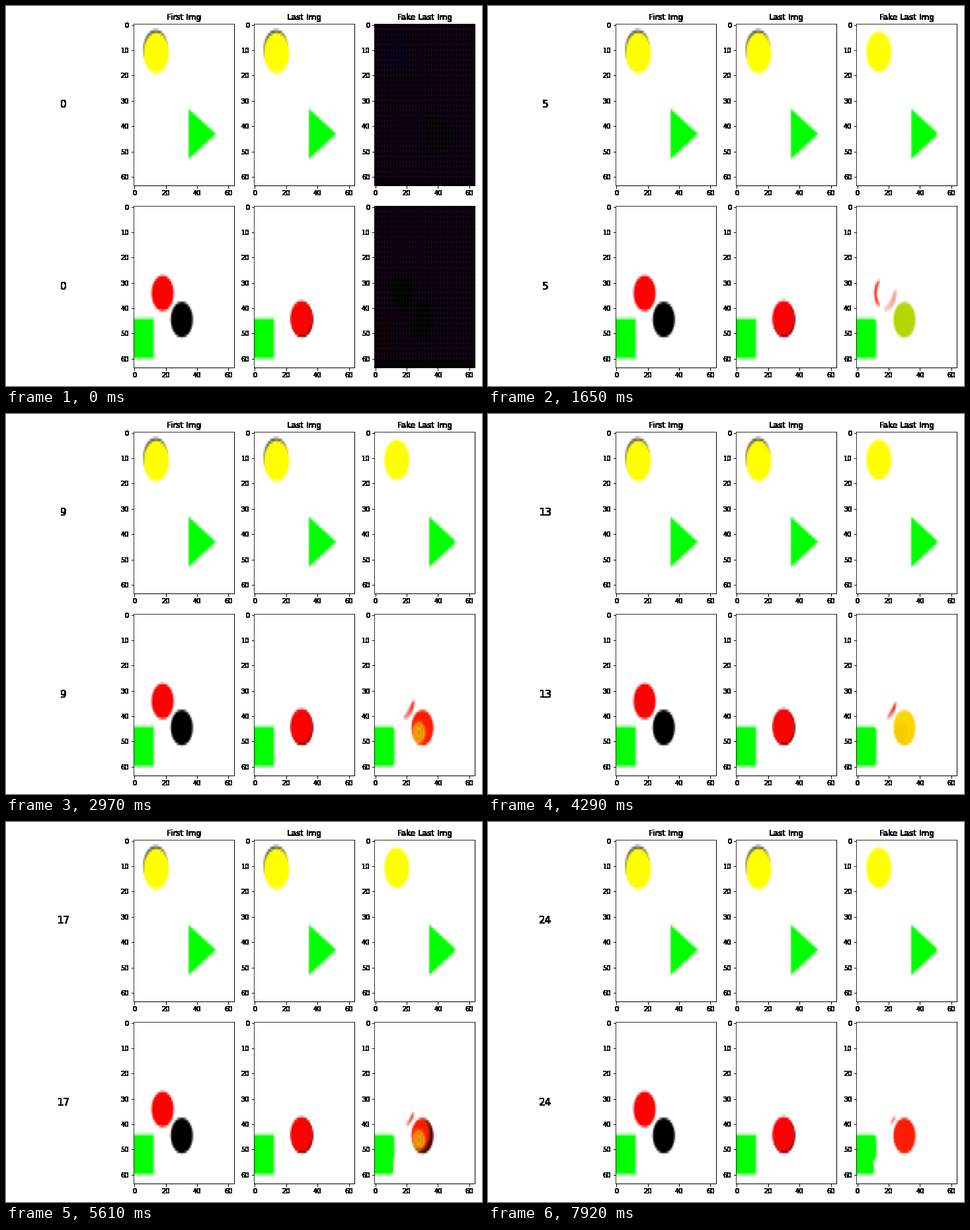
These frames come from a looping animation (720 px wide and 576 px high, 8 s). A matplotlib script:

```python
import numpy as np
import matplotlib.pyplot as plt
from matplotlib.animation import FuncAnimation

W, H, DPI = 720, 576, 72
LOOP, STEP, HOLD = 8000, 40, 330
EPOCHS = 25
TITLES = ("First Img", "Last Img", "Fake Last Img")

YELLOW, GREEN, RED = (255, 255, 0), (0, 255, 0), (255, 0, 0)
BLACK, GRAY, CYAN = (0, 0, 0), (90, 84, 84), (0, 200, 220)
BROWN, SCARLET, AMBER = (65, 38, 10), (245, 65, 42), (240, 175, 10)
Y, X = np.mgrid[0:64, 0:64].astype(float)


def ease(t, start, end):
    u = np.clip((t - start) / (end - start), 0, 1)
    return u * u * (3 - 2 * u)


def bump(t, middle, width):
    return np.exp(-((t - middle) / width) ** 2)


def mix(a, b, u):
    return np.array(a, float) * (1 - u) + np.array(b, float) * u


def blur(epoch):
    return .9 + 2.4 * np.exp(-epoch / 2)


def ramp(d, soft=1.0):
    return np.clip(d / soft + .5, 0, 1)


def dist(cx, cy):
    return np.hypot(X - cx, Y - cy)


def disc(cx, cy, r, soft=1.0):
    return ramp(r - dist(cx, cy), soft)


def triangle(soft=1.0, tip=52.0):
    slope = 9.9 / 17.4
    side = (9.9 - slope * (X - 34.6) - abs(Y - 43.2)) / np.hypot(1, slope)
    return ramp(X - 34.6, soft) * ramp(side, soft) * ramp(tip - X, soft)


def square(soft=1.0, corner=0.0, bite=0.0):
    right = 12.3 - bite * (1.4 * ramp(Y - 54, 2.5) + .8 * bump(Y, 55, 1))
    dx = X - right + corner
    dy = abs(Y - 52.05) - 7.85 + corner
    out = np.hypot(np.maximum(dx, 0), np.maximum(dy, 0))
    return ramp(corner - out - np.minimum(np.maximum(dx, dy), 0), soft)


def paint(img, mask, color):
    img += mask[..., None] * (np.asarray(color, float) - img)


def blank(color=(255, 255, 255)):
    return np.ones((64, 64, 3)) * np.array(color, float)


def real_top():
    img = blank()
    paint(img, disc(13.6, 10, 7.9), GRAY)
    paint(img, disc(14, 11.2, 8), YELLOW)
    paint(img, triangle(), GREEN)
    return img


def real_bottom(last):
    img = blank()
    paint(img, disc(30.2, 44.6, 7), BLACK)
    paint(img, disc(29.8, 44.2, 7) if last else disc(18, 34.2, 7), RED)
    paint(img, square(), GREEN)
    return img


def dark_noise(shapes):
    img = blank((13, 3, 16))
    for mask, color in shapes:
        paint(img, mask, color)
    grid = (1 + .45 * np.cos(np.pi * X)) * (1 + .45 * np.cos(np.pi * Y))
    border = np.where((Y < 1) | (Y > 60) | (X > 62), .5, 1)
    return img * (grid * border)[..., None]


def fake_top(epoch):
    if epoch == 0:
        return dark_noise([(disc(14, 10.5, 8, 3), (8, 3, 22)),
                           (triangle(3), (8, 5, 8))])
    soft = blur(epoch)
    img = blank()
    paint(img, disc(13.9, 10.8, 7.9, soft), YELLOW)
    paint(img, triangle(soft * 1.5) * .35 * (1 - ease(epoch, 1, 5)), CYAN)
    paint(img, triangle(soft, 51), GREEN)
    return img


def remnant(img, epoch):
    """What is left of the red disc after the network learns to move it."""
    d = dist(18, 34.2)
    body = 1 - ease(epoch, 2, 5)
    paint(img, disc(18, 34.3, 6.8, blur(epoch)) * body, (255, 0, 22))
    smear = bump(X, 25.5, 2.8) * bump(Y, 40, 2.8)
    paint(img, smear * body * .8, (255, 70, 90))

    age = epoch / (EPOCHS - 1)
    off = np.degrees(np.arctan2(Y - 34.2, X - 18)) - 43
    half = 62 - 44 * age
    thick = (3.3 - 2.2 * age) * (1 - .5 * np.clip(off / half, -1, 1) ** 2)
    arc = ramp(7.1 - d) * ramp(d - 7.1 + thick) * ramp(half - abs(off), 12)
    fade = np.clip(.85 - .35 * off / half, .2, 1)
    paint(img, arc * fade * ease(epoch, 1, 9), SCARLET)

    left = ramp(7 - d) * ramp(d - 5.4) * ramp(4.8 - abs(Y - 34.3), 3) * (X < 15)
    paint(img, left * bump(epoch, 5, 1.5), (255, 45, 25))


def ball(img, epoch):
    # Yellow and red alternate until the colour settles on red
    swing = (1 + np.cos(2 * np.pi * (epoch - 5) / 8)) / 2
    swing *= 1 - ease(epoch, 14, 20)
    bright = (180 + 72 * ease(epoch, 5, 9), 30 + 185 * swing, 4)
    grown = ease(epoch, 2, 5)
    skin = blank(mix(BROWN, bright, grown))

    d = dist(27.9, 46.6)
    patch = ease(epoch, 5, 9) * (1 - ease(epoch, 16, 22)) * (1 - .7 * swing)
    wave = 1 - .3 * (1 + np.sin(3.1 * d)) / 2
    paint(skin, ramp(4.2 - d, 2) * wave * patch, AMBER)

    rim = ramp(dist(30.2, 44.7) - 5.8, 2) * (1 - grown)
    paint(skin, rim * .6, (25, 15, 20))
    shadow = ramp(dist(27.8, 43.4) - 7, 2.5) * bump(epoch, 17, 2)
    paint(skin, shadow * .9, (45, 8, 0))
    img += disc(30.2, 44.7, 7, blur(epoch))[..., None] * (skin - img)


def fake_bottom(epoch):
    if epoch == 0:
        return dark_noise([(disc(18, 34, 7, 4), (3, 6, 4)),
                           (disc(30, 44.5, 7, 4), (3, 6, 4)),
                           (square(3), (15, 2, 9))])
    soft = blur(epoch)
    img = blank()
    remnant(img, epoch)
    ball(img, epoch)
    paint(img, square(soft * 1.5, 2) * .35 * (1 - ease(epoch, 1, 5)), CYAN)
    paint(img, square(soft, 1.8, ease(epoch, 12, 24)), GREEN)
    return img


def to_unit(img):
    return np.clip(img / 255, 0, 1)


def show(ax, img):
    ax.set_xticks(range(0, 61, 20))
    ax.set_yticks(range(0, 61, 10))
    return ax.imshow(to_unit(img), aspect="auto")


def label(ax):
    ax.axis("off")
    return ax.text(.5, .5, "0", fontsize=15, ha="center", va="center")


def snapshot():
    # Dropping the alpha channel turns every touched text pixel solid
    fig.canvas.draw()
    return np.array(fig.canvas.buffer_rgba())[..., :3].copy()


plt.rcParams.update({"font.family": "DejaVu Sans", "font.size": 10})
fig, axes = plt.subplots(2, 4, figsize=(W / DPI, H / DPI), dpi=DPI,
                         facecolor=(1, 1, 1, 0))
makers = (fake_top, fake_bottom)
counters = [label(ax) for ax in axes[:, 0]]
for col in (0, 1):
    show(axes[0, col + 1], real_top())
    show(axes[1, col + 1], real_bottom(last=col == 1))
fakes = [show(ax, make(0)) for ax, make in zip(axes[:, 3], makers)]
for ax, title in zip(axes[0, 1:], TITLES):
    ax.set_title(title)
fig.tight_layout()

shots = []
for epoch in range(EPOCHS):
    for counter, picture, make in zip(counters, fakes, makers):
        counter.set_text(str(epoch))
        picture.set_data(to_unit(make(epoch)))
    shots.append(snapshot())

fig.clear()
fig.set_facecolor("white")
stage = fig.figimage(shots[0], origin="upper")


def update(n):
    epoch = min((n * STEP + STEP // 2) // HOLD, EPOCHS - 1)
    stage.set_data(shots[epoch])
    return [stage]


anim = FuncAnimation(fig, update, frames=LOOP // STEP, interval=STEP,
                     repeat=True, repeat_delay=0)
plt.show()
```
